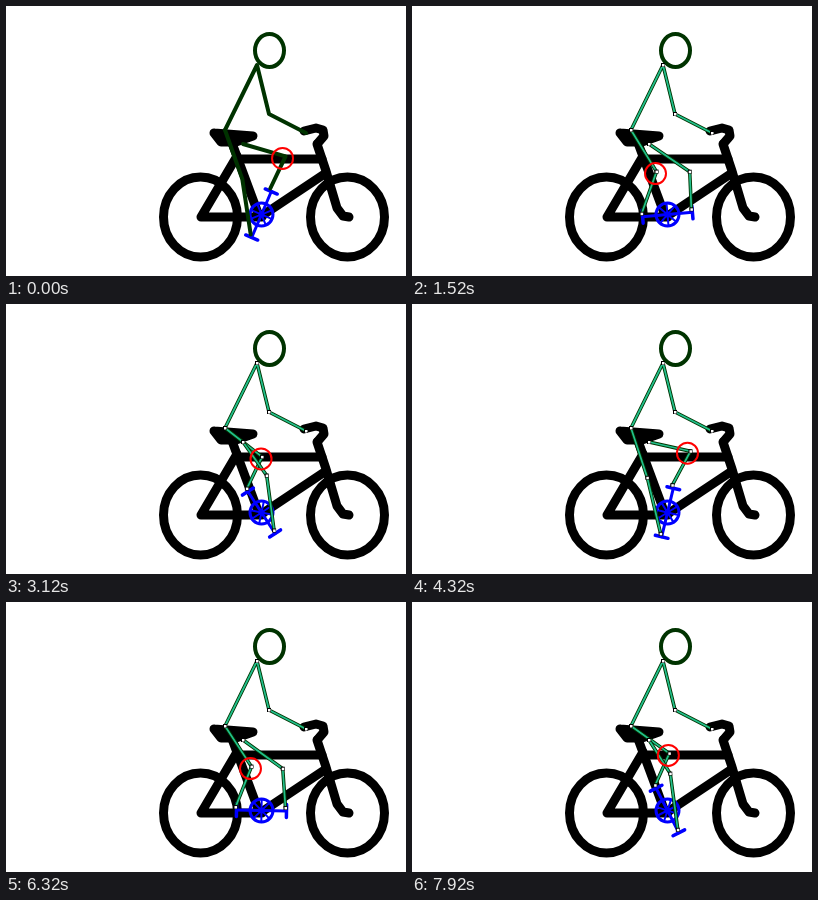
Animation of 400 by 270 pixels, one loop 8000 ms. Source, as an HTML page with a canvas:

```html
<!DOCTYPE html>
<html lang="en">
<head>
<meta charset="utf-8">
<title>Cyclist</title>
<style>
html, body { margin: 0; width: 100%; height: 100%; overflow: hidden; background: #fff; }
canvas { display: block; }
</style>
</head>
<body>
<canvas id="stage" width="400" height="270"></canvas>
<script>
const ctx = document.getElementById("stage").getContext("2d");
const LOOP = 8000, STEP = 400, LEAD = 80;
const BLACK = "#000", DARK = "#003300", TEAL = "#22c08c", BLUE = "#0000ff", RED = "#ff0000";
const CRANK = [255.5, 208.5], CRANK_LENGTH = 25;
const HIP = [219, 124], NEAR_HIP = [237, 138];

// where each knee starts, passes and ends during a half turn
const NEAR_KNEE = [[278, 146], [275, 168], [240, 170]];
const FAR_KNEE = [[235, 174], [247, 163], [266, 141]];

const polar = (r, a) => [r * Math.cos(a), r * Math.sin(a)];
const add = ([x, y], [dx, dy]) => [x + dx, y + dy];

// smooth curve through three points
function along([a, b, c], u) {
  const wa = (1 - u) * (1 - 2 * u), wb = 4 * u * (1 - u), wc = u * (2 * u - 1);
  return a.map((v, i) => v * wa + b[i] * wb + c[i] * wc);
}

function line(points, color, width) {
  ctx.beginPath();
  points.forEach(p => ctx.lineTo(...p));
  ctx.strokeStyle = color;
  ctx.lineWidth = width;
  ctx.stroke();
}

function ring([x, y], rx, ry, color, width) {
  ctx.beginPath();
  ctx.ellipse(x, y, rx, ry, 0, 0, 2 * Math.PI);
  ctx.strokeStyle = color;
  ctx.lineWidth = width;
  ctx.stroke();
}

function drawBike() {
  for (const x of [194.5, 341.5]) ring([x, 211], 37, 40, BLACK, 9);
  line([[256, 211], [195, 211], [231, 150]], BLACK, 9);
  line([[226, 137], [252, 207]], BLACK, 9);
  line([[257, 209], [320, 167]], BLACK, 9);
  line([[231, 153], [316, 153]], BLACK, 9);
  line([[311, 138], [320, 165], [331, 202], [337, 210], [343, 211]], BLACK, 9);
  line([[298, 125], [310, 122], [317, 124], [318, 130], [312, 137]], BLACK, 9);
  line([[208, 127], [247, 130], [230, 136], [215, 136], [208, 127]], BLACK, 9);
  ctx.fillStyle = BLACK;
  ctx.fill();
}

function drawCrank(angle) {
  const spoke = (r, a) => [add(CRANK, polar(r, a)), add(CRANK, polar(-r, a))];
  ring(CRANK, 11.5, 11.5, BLUE, 3);
  for (let i = 0; i < 4; i++) line(spoke(11, angle + i * Math.PI / 4), BLUE, 2);
  ring(CRANK, 1.5, 1.5, BLUE, 3);

  const ends = spoke(CRANK_LENGTH, angle);
  line(ends, BLUE, 3);
  const tilt = polar(6.5, angle + Math.PI / 2);
  for (const end of ends) line([add(end, tilt), add(end, tilt.map(v => -v))], BLUE, 3.5);
}

function drawLimb(points, plain) {
  line(points, DARK, plain ? 4 : 3.5);
  if (plain) return;
  line(points, TEAL, 1.7);
  for (const [x, y] of points) {
    ctx.fillStyle = BLACK;
    ctx.fillRect(x - 2, y - 2, 4, 4);
    ctx.fillStyle = "#fff";
    ctx.fillRect(x - 1, y - 1, 2.5, 2.5);
  }
}

function draw(now) {
  const step = Math.floor((now % LOOP + LEAD) / STEP);
  const plain = step === 0;
  const progress = (13 + 15.5 * step) / 180 % 1;
  const angle = (progress * 180 - 80) * Math.PI / 180;
  const foot = r => add(add(CRANK, polar(r, angle)), [-1, -3]);
  const nearKnee = along(NEAR_KNEE, progress);
  const farKnee = along(FAR_KNEE, progress);

  ctx.fillStyle = "#fff";
  ctx.fillRect(0, 0, 400, 270);
  ctx.lineCap = ctx.lineJoin = "round";
  drawBike();
  drawCrank(angle);
  ring([263.5, 44.5], 14.5, 16.5, DARK, 4);
  drawLimb([HIP, [251, 59], [263, 108], [300, 127]], plain);
  drawLimb([HIP, farKnee, foot(-CRANK_LENGTH)], plain);
  drawLimb([NEAR_HIP, nearKnee, foot(CRANK_LENGTH)], plain);
  if (progress < 0.3) ring(add(nearKnee, [-3, 2]), 10.5, 10.5, RED, 2);
  if (progress > 0.2) ring(add(farKnee, [-1, 2]), 10.5, 10.5, RED, 2);
}

function tick() {
  draw(performance.now());
  requestAnimationFrame(tick);
}
tick();
</script>
</body>
</html>
```
